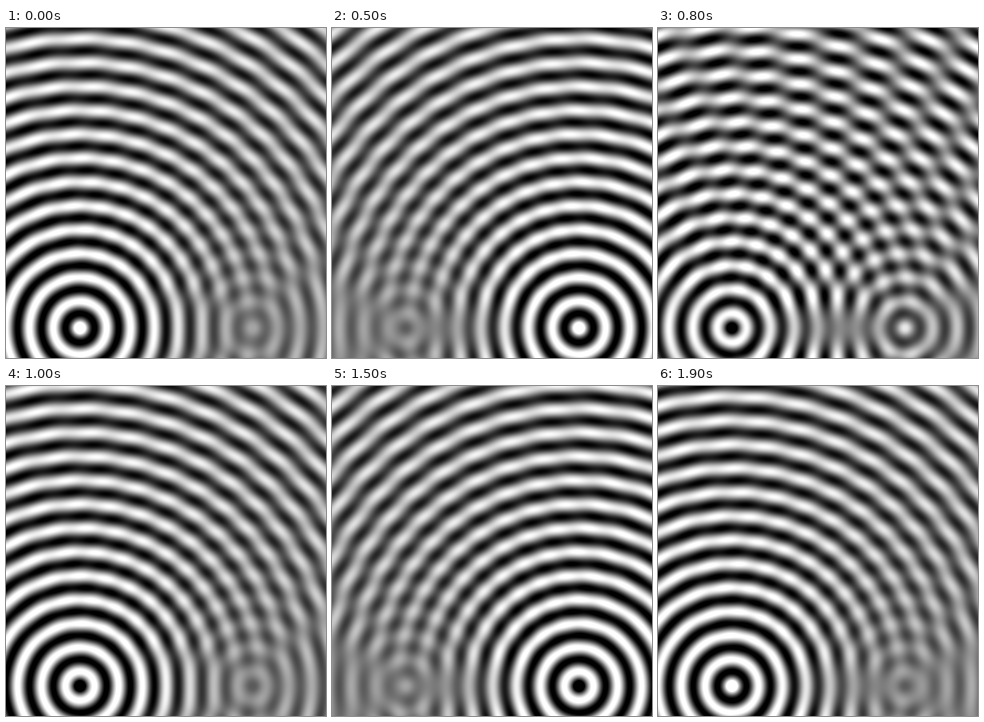
Animation, 320 px wide and 330 px high, one loop 2 s. Source, as an HTML page with a canvas:

```html
<!DOCTYPE html>
<html lang="en">
<head>
<meta charset="utf-8">
<title>Two wave sources</title>
<style>
  html, body { margin: 0; width: 100%; height: 100%; overflow: hidden; background: #808080; }
  canvas { display: block; width: 320px; height: 330px; }
</style>
</head>
<body>
<canvas id="stage" width="320" height="330"></canvas>
<script>
const W = 320, H = 330, LOOP = 2000, STEP = 100;
const K = 2 * Math.PI / 23.86;
const Q = Math.PI / 4;
const GAIN = 1.15;
const left = { x: 74, y: 300 }, right = { x: 247, y: 300 };

const ctx = document.getElementById("stage").getContext("2d");
const image = ctx.createImageData(W, H);
const pixels = new Uint32Array(image.data.buffer);
const waveA = new Float32Array(W * H);
const waveB = new Float32Array(W * H);

// Circular standing wave, close to a Bessel function in phase
function ring(r) {
  const phase = Math.hypot(K * r, Q) - Q;
  const core = 1 + 0.6 * Math.exp(-((r / 7) ** 2));
  return GAIN * core * Math.cos(phase);
}

// Each wave is weighted by inverse distance, with unit total power
for (let y = 0, i = 0; y < H; y++) {
  for (let x = 0; x < W; x++, i++) {
    const ra = Math.hypot(x + 0.5 - left.x, y + 0.5 - left.y);
    const rb = Math.hypot(x + 0.5 - right.x, y + 0.5 - right.y);
    const norm = Math.hypot(ra, rb);
    waveA[i] = ring(ra) * rb / norm;
    waveB[i] = ring(rb) * ra / norm;
  }
}

function draw(step) {
  const angle = 2 * Math.PI * (step + 0.5) * STEP / LOOP;
  const a = Math.cos(angle), b = Math.sin(angle);
  for (let i = 0; i < pixels.length; i++) {
    const v = Math.max(-1, Math.min(1, a * waveA[i] + b * waveB[i]));
    const g = Math.round(127.5 + 127.5 * v);
    pixels[i] = 0xff000000 | g << 16 | g << 8 | g;
  }
  ctx.putImageData(image, 0, 0);
}

let start = null, shown = -1;
function tick(now) {
  if (start === null) start = now;
  const step = Math.floor(((now - start) % LOOP) / STEP);
  if (step !== shown) draw(shown = step);
  requestAnimationFrame(tick);
}
draw(0);
requestAnimationFrame(tick);
</script>
</body>
</html>
```
